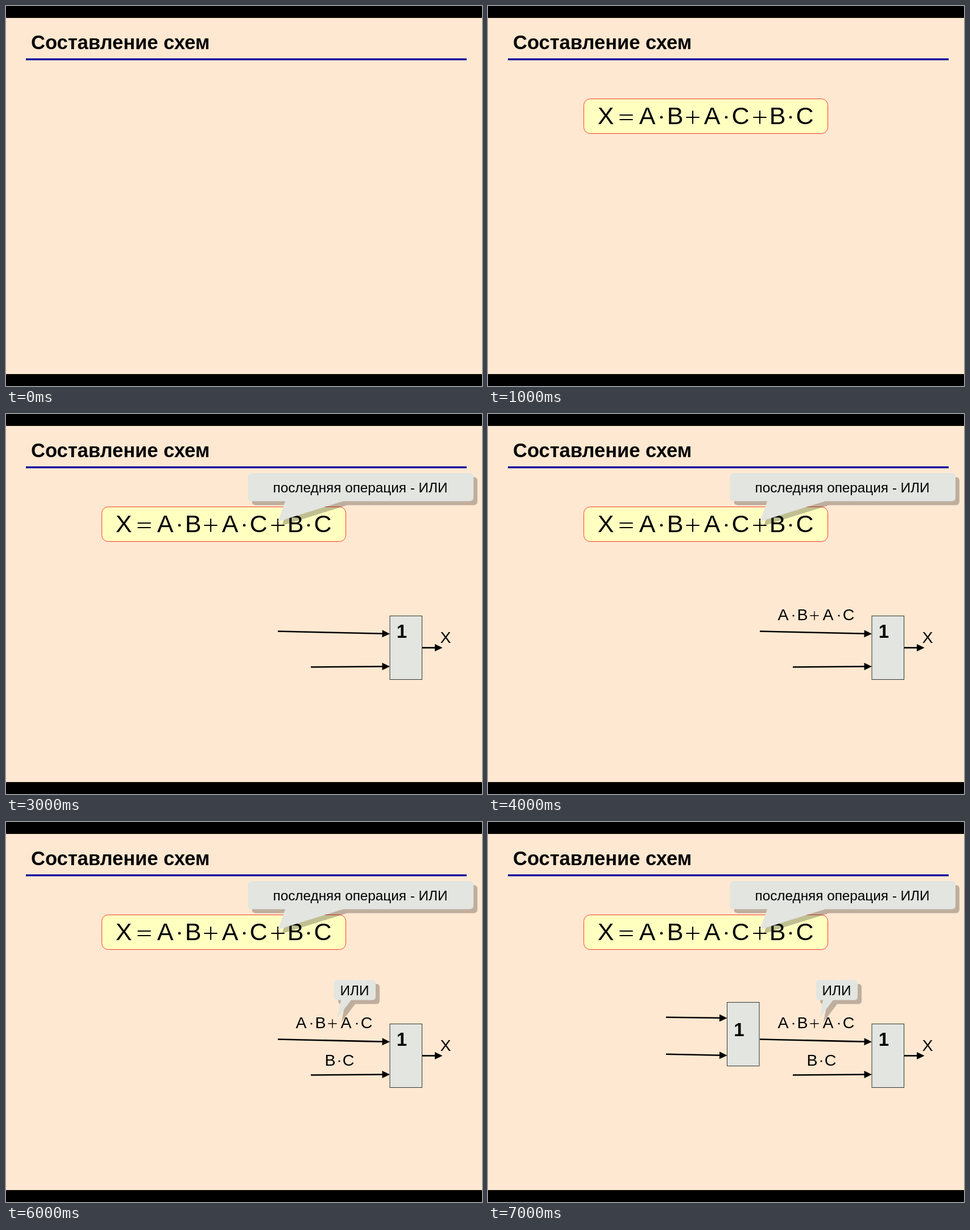
Write an HTML page that moves like this. It is 837 px wide and 669 px high and loops after 8000 ms.

```html
<!DOCTYPE html>
<html lang="ru">
<meta charset="utf-8">
<style>
  html, body { margin: 0; width: 100%; height: 100%; overflow: hidden; background: #000; }
  svg { display: block; width: 837px; height: 669px; font-family: "Liberation Sans", Arial, sans-serif; }
</style>
<svg id="stage" viewBox="0 0 837 669"></svg>
<script>
const GREY = '#e2e5e0';

const text = (str, x, y, size, extra = 'text-anchor="middle"') =>
  `<text x="${x}" y="${y}" font-size="${size}" ${extra}>${str}</text>`;

const bold = 'text-anchor="middle" font-weight="bold"';

// Letters are centred on the given x positions; operators are drawn as strokes.
function formula(tokens, xs, baseline, size) {
  const mid = baseline - size * 0.28, r = size * 0.27;
  return [...tokens].map((t, i) => {
    const x = xs[i];
    if (t === '·') return `<circle cx="${x}" cy="${mid}" r="${size * 0.055}"/>`;
    const stroke = d => `<path d="${d}" stroke="#000" stroke-width="${size * 0.048}"/>`;
    if (t === '+') return stroke(`M${x - r} ${mid}h${2 * r}M${x} ${mid - r}v${2 * r}`);
    if (t === '=') return stroke(`M${x - r} ${mid - 4}h${2 * r}m0 8h${-2 * r}`);
    return text(t, x, baseline, size);
  }).join('');
}

function callout(label, x, y, w, h, r, tail, labelX, baseline) {
  const shape = `M${x + r} ${y}h${w - 2 * r}q${r} 0 ${r} ${r}v${h - 2 * r}q0 ${r} ${-r} ${r}` +
    `H${tail[0]}L${tail[1]} ${tail[2]}L${tail[3]} ${y + h}H${x + r}q${-r} 0 ${-r} ${-r}v${2 * r - h}q0 ${-r} ${r} ${-r}z`;
  return `<path d="${shape}" transform="translate(7 7)" fill="#000" fill-opacity=".25"/>` +
    `<path d="${shape}" fill="${GREY}"/>` + text(label, labelX, baseline, 24.3);
}

function arrow(x1, y1, x2, y2) {
  const angle = Math.atan2(y2 - y1, x2 - x1) * 180 / Math.PI;
  const len = Math.hypot(x2 - x1, y2 - y1);
  return `<g transform="translate(${x1} ${y1}) rotate(${angle})">` +
    `<path d="M0 0H${len - 10}" stroke="#000" stroke-width="2.6"/>` +
    `<path d="M${len} 0l-13.5 -6.5v13z"/></g>`;
}

const gate = (x, y, baseline) =>
  `<rect x="${x}" y="${y}" width="56.5" height="112" fill="${GREY}" stroke="#333"/>` +
  text('1', x + 21, baseline, 33, bold);

const backdrop =
  '<rect y="21" width="837" height="627" fill="#ffe8d1"/>' +
  '<path d="M35 93.8H810" stroke="#00009c" stroke-width="3.2"/>' +
  text('Составление схем', 44, 76, 34.5, 'font-weight="bold"');

// One entry appears each second, starting at 1 s.
const steps = [
  '<rect x="168.5" y="163.5" width="429" height="61" rx="11" fill="#ffffc0" stroke="#ff3a30"/>' +
    formula('X=A·B+A·C+B·C', [207, 243, 280, 305, 329, 360, 394, 419, 444, 478, 509, 532, 557], 208, 43),
  callout('последняя операция - ИЛИ', 425.5, 104, 396.5, 49.5, 7, [593, 478, 189.5, 491], 623, 138),
  arrow(478, 382.5, 675, 387) + arrow(536, 445.5, 675, 444.5) + arrow(731, 411.5, 767.5, 411.5) +
    gate(675, 355.5, 393.5) + text('X', 773, 403, 28.5),
  formula('A·B+A·C', [519, 537, 553, 574, 598, 617, 634], 363, 28.5),
  formula('B·C', [570, 586, 602], 429, 28.5),
  callout('ИЛИ', 577, 278, 73, 35.5, 6, [607, 583, 345, 589], 613, 304.5),
  arrow(313, 343.8, 420.5, 345.2) + arrow(313, 408.8, 420.5, 411) + gate(420.5, 317.5, 376.5)
];

const stage = document.getElementById('stage');
stage.innerHTML = backdrop + steps.map(s => `<g class="step">${s}</g>`).join('');
const groups = stage.querySelectorAll('.step');

function draw() {
  const t = performance.now() % 8000;
  groups.forEach((g, i) => g.setAttribute('visibility', t >= (i + 1) * 1000 ? 'visible' : 'hidden'));
  requestAnimationFrame(draw);
}
draw();
</script>
</html>
```
